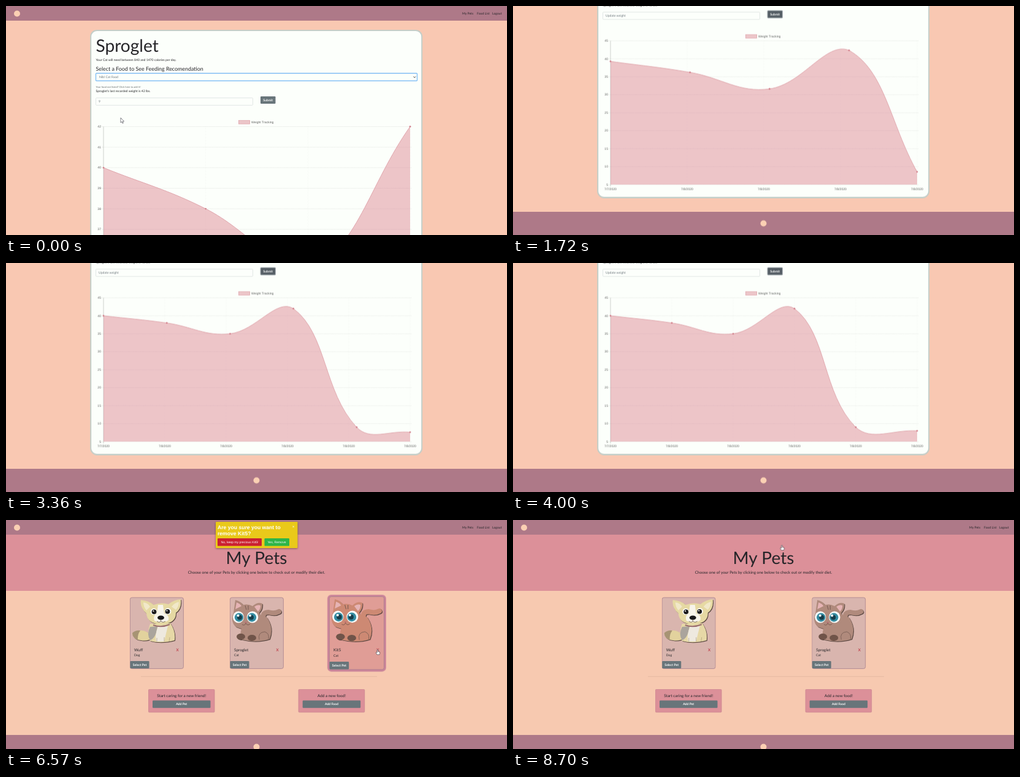
Write an HTML page that moves like this. It is 817 px wide and 375 px high and loops after 8770 ms.

```html
<!DOCTYPE html>
<html lang="en">
<head>
<meta charset="utf-8">
<title>Pet weight tracker</title>
<style>
html, body { margin: 0; width: 100%; height: 100%; overflow: hidden; background: #f8c8b1; }
svg { display: block; width: 817px; height: 375px; }
text { font: 5.1px Lato, sans-serif; fill: #262529; text-rendering: geometricPrecision; }
.title { font-size: 28.1px; }
.h3 { font-size: 8.9px; }
.lead { font-size: 6.4px; }
.small { font-size: 4.1px; fill: #666c70; }
.mid { text-anchor: middle; }
.end { text-anchor: end; }
.btn { fill: #68757a; }
.btn-text { fill: #fff; font-weight: 700; text-anchor: middle; }
.muted { fill: #687078; }
.plot text, .sans { font-family: "Liberation Sans", Arial, sans-serif; }
.plot text { fill: #616161; }
.bar { fill: #ae7988; }
.pink { fill: #dc9099; }
.logo { fill: #fbd0b3; }
.field { fill: #fcfffb; stroke: #c8cfd1; stroke-width: .5; }
.ring { fill: none; stroke: #85c0f5; stroke-width: 1.4; }
.white { fill: #fff; }

.loop, .step { animation-duration: 8770ms; animation-iteration-count: infinite; }
.loop { animation-timing-function: ease-in-out; }
.step { animation-timing-function: step-end; }

.weight { animation-name: weight; }
.pets { animation-name: pets; }
@keyframes weight { 0% { visibility: visible } 46.64%, 100% { visibility: hidden } }
@keyframes pets { 0% { visibility: hidden } 46.64%, 100% { visibility: visible } }

.scroll { animation-name: scroll; }
@keyframes scroll {
  0%, 2.28% { transform: translateY(0) }
  8.44%, 100% { transform: translateY(-140.5px) }
}

.nine { animation-name: nine; }
.hint { animation-name: hint; }
.eight { animation-name: eight; }
.focus { animation-name: focus; }
.hot { animation-name: hot; }
@keyframes nine { 0% { opacity: 1 } 14.82%, 100% { opacity: 0 } }
@keyframes hint { 0% { opacity: 0 } 14.82% { opacity: 1 } 30.8% { opacity: 0 } 33.75%, 100% { opacity: 1 } }
@keyframes eight { 0% { opacity: 0 } 30.8% { opacity: 1 } 33.75%, 100% { opacity: 0 } }
@keyframes focus { 0% { opacity: 0 } 28.5% { opacity: 1 } 33.7%, 100% { opacity: 0 } }
@keyframes hot { 0% { opacity: 0 } 14.3% { opacity: 1 } 26.5% { opacity: 0 } 33.7%, 100% { opacity: 1 } }

.card { fill: #d9b5ae; stroke: #a8808d; stroke-width: .8; }
.art { filter: drop-shadow(1.5px 1.3px .5px #57453f); }
.cat { color: #b08a7c; }
.x { fill: #b8202f; text-anchor: middle; }
.first { animation-name: first; }
.second { animation-name: second; }
.third { animation-name: third; }
@keyframes first { 0% { transform: translate(202px, 127px) } 85.5%, 100% { transform: translate(242.7px, 127px) } }
@keyframes second { 0% { transform: translate(365px, 127px) } 85.5%, 100% { transform: translate(487.3px, 127px) } }
@keyframes third { 0% { opacity: 1 } 85.5%, 100% { opacity: 0 } }

.grow { transform-origin: 43.5px 58px; animation-name: grow; }
.glow { fill: none; stroke: #c98399; stroke-width: 4; filter: blur(.7px); animation-name: glow; }
.warm-card { animation-name: warm-card; }
.warm-fur { animation-name: warm-fur; }
@keyframes grow { 0%, 54.7% { transform: scale(1) } 56.4%, 77.3% { transform: scale(1.024) } 79%, 100% { transform: scale(1) } }
@keyframes glow { 0%, 56.5% { opacity: 0 } 62.5%, 77.3% { opacity: 1 } 82%, 100% { opacity: 0 } }
@keyframes warm-card { 0%, 54.7% { fill: #d9b5ae } 61.6%, 77.3% { fill: #e09d96 } 82%, 100% { fill: #d9b5ae } }
@keyframes warm-fur { 0%, 54.7% { color: #b08a7c } 61.6%, 77.3% { color: #cd8973 } 82%, 100% { color: #b08a7c } }

.alert { animation-name: alert; }
.alert text { fill: #fff; }
.alert .ask { font-size: 8.6px; font-weight: 700; }
.alert .box { fill: #e9c91a; filter: drop-shadow(0 1px 1.5px #0006); }
@keyframes alert {
  0%, 69.1% { transform: translateY(-52px); opacity: 0 }
  72.4%, 84.9% { transform: none; opacity: 1 }
  87.2%, 100% { transform: translateY(-52px); opacity: 0 }
}

.pointer { animation-name: pointer; }
@keyframes pointer {
  0%, 2.28% { transform: translate(187px, 183px) }
  8.44%, 10.3% { transform: translate(184.5px, 126px) }
  14.3%, 26.2% { transform: translate(427px, 13px) }
  28.5%, 31.9% { transform: translate(200px, 16px) }
  34.2%, 46.63% { transform: translate(427px, 13px) }
  46.64%, 49% { transform: translate(753px, 14px) }
  57.6%, 58.7% { transform: translate(544px, 196px) }
  65.6%, 76.4% { transform: translate(606px, 212px) }
  83.8%, 100% { transform: translate(438.5px, 41px) }
}
.arrow { animation-name: arrow; }
.hand { animation-name: hand; }
@keyframes arrow {
  0% { opacity: 1 } 14.1% { opacity: 0 } 26.2% { opacity: 1 } 28.4% { opacity: 0 }
  31.9% { opacity: 1 } 34% { opacity: 0 } 46.64% { opacity: 1 } 65% { opacity: 0 }
  77.2% { opacity: 1 } 82.6%, 100% { opacity: 0 }
}
@keyframes hand { 0% { opacity: 0 } 65% { opacity: 1 } 77.2% { opacity: 0 } 82.6%, 100% { opacity: 1 } }
</style>
</head>
<body>
<svg viewBox="0 0 817 375">
  <defs>
    <g id="nav">
      <rect class="bar" width="817" height="24"/>
      <circle class="logo" cx="18" cy="12.5" r="5"/>
      <text x="744" y="14">My Pets</text>
      <text x="768" y="14">Food List</text>
      <text x="793" y="14">Logout</text>
    </g>
    <g id="foot">
      <rect class="bar" width="817" height="39"/>
      <circle class="logo" cx="408.5" cy="19.5" r="5"/>
    </g>
    <g id="select">
      <rect class="btn" x=".5" y="104" width="31" height="12" rx="1.3"/>
      <text class="btn-text" x="16" y="111.7">Select Pet</text>
      <text class="x lead" x="77.5" y="87.6">X</text>
    </g>
    <g id="dog" class="art">
      <path d="M29 57Q17 50 4 58Q5 69 18 70Q29 72 37 66Z" fill="#e2d29d"/>
      <path d="M4 58Q10 53 17 54Q12 61 13 69Q4 66 4 58Z" fill="#a79474"/>
      <path d="M33 43Q27 60 33 71Q51 76 73 70Q75 55 66 42Z" fill="#e6d8a6"/>
      <path d="M33 48Q27 60 33 70Q43 66 45 47Z" fill="#aaa49c"/>
      <path d="M46 47Q40 62 43 72H56Q59 58 62 47Z" fill="#eee9df"/>
      <path d="M27 26Q16 16 18 4Q31 5 39 12Q51 7 63 11Q73 3 83 3Q85 18 75 25Q76 42 52 44Q28 43 27 26Z" fill="#e6d9a3"/>
      <path d="M22 8Q30 9 33 15L27 21Q22 15 22 8ZM80 7Q72 9 68 15L75 20Q80 15 80 7Z" fill="#f1e8c9"/>
      <path d="M46 12H54L56 26Q65 29 63 37Q52 44 40 38Q37 30 44 26Z" fill="#f7f4ea"/>
      <circle cx="39" cy="23" r="5.2" fill="#fff"/>
      <circle cx="62" cy="22.5" r="5.2" fill="#fff"/>
      <circle cx="39.5" cy="23.3" r="3.9" fill="#1c1b1c"/>
      <circle cx="61.5" cy="22.8" r="3.9" fill="#1c1b1c"/>
      <circle cx="38.4" cy="22" r="1.1" fill="#fff"/>
      <circle cx="60.4" cy="21.5" r="1.1" fill="#fff"/>
      <ellipse cx="50.5" cy="33" rx="5.5" ry="3.5" fill="#191819"/>
      <path d="M50.5 36V39M44 39Q48 42 50.5 39Q54 42 58 39" fill="none" stroke="#554438" stroke-width=".7"/>
      <path d="M38 45Q51 50 65 44" fill="none" stroke="#9a6d70" stroke-width="2"/>
      <path d="M44 66V72M56 65V72M65 65L64 72" stroke="#a59473" stroke-width=".6"/>
    </g>
    <g id="cat" class="art">
      <path d="M57 40Q50 24 63 24Q73 27 80 23" fill="none" stroke="currentColor" stroke-width="8" stroke-linecap="round"/>
      <path d="M22 43Q14 61 20 69Q43 75 65 68Q72 50 61 33L40 24Z" fill="currentColor"/>
      <path d="M6 25L9 4Q17 6 22 12Q30 10 37 14Q46 6 53 10Q54 19 48 25Q53 45 37 50Q23 54 10 48Q0 39 6 25Z" fill="currentColor"/>
      <path d="M9 19L11 8Q17 10 19 14ZM40 15Q45 11 50 13Q50 19 46 23Z" fill="#e6b4b5"/>
      <path d="M25 13L27 20M30 13L30 20" stroke="#765b52" stroke-width="1"/>
      <ellipse cx="14" cy="32" rx="9" ry="9.6" fill="#f8fbfa"/>
      <ellipse cx="37" cy="32" rx="9.3" ry="9.6" fill="#f8fbfa"/>
      <circle cx="15" cy="32.5" r="7.2" fill="#348ca2"/>
      <circle cx="36" cy="32.5" r="7.2" fill="#348ca2"/>
      <circle cx="16" cy="32.5" r="4" fill="#173d4a"/>
      <circle cx="35" cy="32.5" r="4" fill="#173d4a"/>
      <circle cx="13.5" cy="29.5" r="2" fill="#fff"/>
      <circle cx="33" cy="29.5" r="2" fill="#fff"/>
      <path d="M24 40H28L26 42Z" fill="#b76270"/>
      <path d="M20 44Q24 47 26 42Q29 47 33 43" fill="none" stroke="#65483f" stroke-width=".7"/>
      <g fill="#705449">
        <ellipse cx="18" cy="64" rx="7" ry="5"/>
        <ellipse cx="36" cy="66" rx="7" ry="5"/>
      </g>
      <path d="M48 69Q45 57 57 56Q65 59 63 68" fill="none" stroke="#765b52" stroke-width=".8"/>
    </g>
  </defs>

  <g class="step weight">
    <rect width="817" height="375" fill="#f9c8b2"/>
    <g class="loop scroll">
      <use href="#nav"/>
      <use href="#foot" y="477"/>
      <rect x="138.2" y="40" width="540" height="414" rx="10" fill="#fcfffb" stroke="#c4cec8" stroke-width="2"/>
      <text class="title" x="146.5" y="75">Sproglet</text>
      <text x="146.5" y="89.5">Your Cat will need between 840 and 1470 calories per day.</text>
      <text class="h3" x="146.5" y="105.5">Select a Food to See Feeding Recomendation</text>
      <rect class="field" x="146.5" y="110.3" width="524" height="12.2" rx="1"/>
      <rect class="ring" x="146.5" y="110.3" width="524" height="12.2" rx="1"/>
      <text class="muted" x="152" y="118.2">Nib! Cat Food</text>
      <path d="M664.5 115.5l1.8 1.8 1.8-1.8" fill="none" stroke="#222" stroke-width=".9"/>
      <text class="small" x="146.5" y="133.5">Your food not listed? Click here to add it!</text>
      <text x="146.5" y="141">Sproglet's last recorded weight is 42 lbs.</text>
      <rect class="field" x="146.5" y="150.5" width="256" height="12" rx="1.2"/>
      <g class="step focus">
        <rect class="ring" x="146.5" y="150.5" width="256" height="12" rx="1.2"/>
        <path d="M150.5 153.7V159.3" stroke="#333" stroke-width=".5"/>
      </g>
      <text class="muted step nine" x="151" y="158.4">9</text>
      <text class="muted step hint" x="151" y="158.4">Update weight</text>
      <text class="muted step eight" x="151" y="158.4">8</text>
      <rect class="btn" x="415" y="148" width="24.5" height="12" rx="1.2"/>
      <rect class="step hot" x="415" y="148" width="24.5" height="12" rx="1.2" fill="#545d64" stroke="#aab1b5" stroke-width="1.2"/>
      <text class="btn-text" x="427.2" y="155.8">Submit</text>
      <g class="plot">
        <rect x="379.5" y="187.3" width="18" height="5.8" fill="#ecc6c9" stroke="#dfa5ab" stroke-width=".8"/>
        <text x="400" y="192">Weight Tracking</text>
        <g id="axes"></g>
        <path id="area" fill="#d66e7d" fill-opacity=".4"/>
        <path id="line" fill="none" stroke="#dfa5ab"/>
        <g id="dots" fill="#d3838e"></g>
      </g>
    </g>
  </g>

  <g class="step pets">
    <rect width="817" height="375" fill="#f7c9b0"/>
    <use href="#nav"/>
    <rect class="pink" y="24" width="817" height="92"/>
    <use href="#foot" y="352"/>
    <text class="title mid" x="408.5" y="71.5">My Pets</text>
    <text class="lead mid" x="408.5" y="88">Choose one of your Pets by clicking one below to check out or modify their diet.</text>
    <path d="M220 256.3H605" stroke="#0002" stroke-width=".6"/>

    <g class="step first">
      <rect class="card" x=".4" width="87" height="116.4" rx="3"/>
      <use href="#dog"/>
      <use href="#select"/>
      <text class="lead" x="7" y="87.6">Wuff</text>
      <text x="7" y="95.8">Dog</text>
    </g>
    <g class="step second">
      <rect class="card" x=".4" width="87" height="116.4" rx="3"/>
      <use class="cat" href="#cat"/>
      <use href="#select"/>
      <text class="lead" x="7" y="87.6">Sproglet</text>
      <text x="7" y="95.8">Cat</text>
    </g>
    <g class="step third" transform="translate(528 127)">
      <g class="loop grow">
        <rect class="loop glow" x="-.8" y="-1.2" width="89.4" height="118.8" rx="4"/>
        <rect class="card loop warm-card" x=".4" width="87" height="116.4" rx="3"/>
        <use class="cat loop warm-fur" href="#cat"/>
        <use href="#select"/>
        <text class="lead" x="7" y="87.6">Kit5</text>
        <text x="7" y="95.8">Cat</text>
      </g>
    </g>

    <g stroke="#c67f8e" stroke-width=".7">
      <rect class="pink" x="232.4" y="277.4" width="107.6" height="37.4" rx="1.3"/>
      <rect class="pink" x="477.1" y="277.4" width="107.6" height="37.4" rx="1.3"/>
    </g>
    <rect class="btn" x="239" y="295.5" width="94.5" height="12.3" rx="1.2"/>
    <rect class="btn" x="483.7" y="295.5" width="94.5" height="12.3" rx="1.2"/>
    <text class="lead mid" x="286.2" y="290">Start caring for a new friend!</text>
    <text class="lead mid" x="530.9" y="290">Add a new food!</text>
    <text class="btn-text" x="286.2" y="303.4">Add Pet</text>
    <text class="btn-text" x="530.9" y="303.4">Add Food</text>

    <g class="loop alert">
      <rect class="box" x="342" y="3" width="133.5" height="43" rx="1.2"/>
      <text class="sans ask" x="345" y="15">Are you <tspan font-style="italic">sure</tspan> you want to</text>
      <text class="sans ask" x="345" y="25.2">remove Kit5?</text>
      <text class="sans lead mid" x="468.5" y="13">×</text>
      <rect x="345" y="30" width="72" height="12.6" rx="1.2" fill="#cb2030"/>
      <rect x="421.5" y="30" width="40.5" height="12.6" rx="1.2" fill="#2eb548"/>
      <text class="sans mid" x="381" y="38.2">No, keep my precious Kit5!</text>
      <text class="sans mid" x="441.5" y="38.2">Yes, Remove</text>
    </g>
  </g>

  <g class="loop pointer" stroke="#33333d" stroke-width=".6" stroke-linejoin="round">
    <path class="white step arrow" d="M0 0V8L1.8 6.4 3 9.2 4.3 8.6 3.1 5.9H5.5Z"/>
    <path class="white step hand" d="M-.8 .6Q0-.6 .8 .6V3.4L3.6 4.2Q4 6.5 3 8.6H-.8L-3 5.2Q-2.3 4-.8 5.2Z"/>
  </g>
</svg>

<script>
const LOOP = 8770, GROW = 1000;
const L = 159, R = 659, T = 197.5, B = 433, TENSION = 0.4;
const weights = [40, 38, 35, 42, 9, 8];
const stages = [
  { at: 0, count: 4, min: 35, max: 42, step: 1 },
  { at: 1300, count: 5, min: 5, max: 45, step: 5 },
  { at: 2960, count: 6, min: 5, max: 45, step: 5 },
];
const $ = id => document.getElementById(id);
const mix = (a, b, p) => a + (b - a) * p;
const clamp = (v, lo, hi) => Math.min(hi, Math.max(lo, v));

const yOf = (v, s) => mix(B, T, (v - s.min) / (s.max - s.min));
for (const s of stages)
  s.points = weights.slice(0, s.count).map((v, i) => ({ x: mix(L, R, i / (s.count - 1)), y: yOf(v, s) }));

function drawAxes(s) {
  let out = "";
  for (let v = s.min; v <= s.max; v += s.step) {
    const y = yOf(v, s);
    out += `<path d="M156 ${y}H662" stroke="#0002" stroke-width=".6" stroke-dasharray="1.5 .7"/>
      <text class="end" x="155" y="${y + 1.6}">${v}</text>`;
  }
  s.points.forEach(({ x }, i) => {
    out += `<path d="M${x} ${T}V${B + 3}" stroke="${i ? "#0001" : "#0004"}" stroke-width=".7"${i ? ' stroke-dasharray="1 1.5"' : ""}/>
      <text class="mid" x="${x}" y="441.8">7/${i ? 8 : 7}/2020</text>`;
  });
  $("axes").innerHTML = out;
}

// Handles follow the neighbour chord, weighted by distance and kept inside the plot.
function handles(pts, i) {
  const c = pts[i], a = pts[i - 1] || c, b = pts[i + 1] || c;
  const da = Math.hypot(c.x - a.x, c.y - a.y), db = Math.hypot(b.x - c.x, b.y - c.y);
  const at = k => `${clamp(c.x + k * (b.x - a.x), L, R)} ${clamp(c.y + k * (b.y - a.y), T, B)}`;
  return { before: at(-TENSION * da / (da + db)), after: at(TENSION * db / (da + db)) };
}

function drawCurve(pts) {
  const h = pts.map((_, i) => handles(pts, i));
  const d = pts.map((p, i) => i ? `C${h[i - 1].after} ${h[i].before} ${p.x} ${p.y}` : `M${p.x} ${p.y}`).join("");
  $("line").setAttribute("d", d);
  $("area").setAttribute("d", `${d}V${B}H${L}Z`);
  $("dots").innerHTML = pts.map(p => `<circle cx="${p.x}" cy="${p.y}" r="1.4"/>`).join("");
}

let shown = -1;
const start = performance.now();
function render() {
  const t = (performance.now() - start) % LOOP;
  const n = stages.findLastIndex(s => t >= s.at);
  const s = stages[n], old = stages[n - 1];
  if (n !== shown) drawAxes(s);
  shown = n;
  const p = 1 - (1 - clamp((t - s.at) / GROW, 0, 1)) ** 4;
  drawCurve(old ? s.points.map((to, i) => {
    const from = old.points[i] || { x: to.x, y: B };
    return { x: mix(from.x, to.x, p), y: mix(from.y, to.y, p) };
  }) : s.points);
  requestAnimationFrame(render);
}
render();
</script>
</body>
</html>
```
